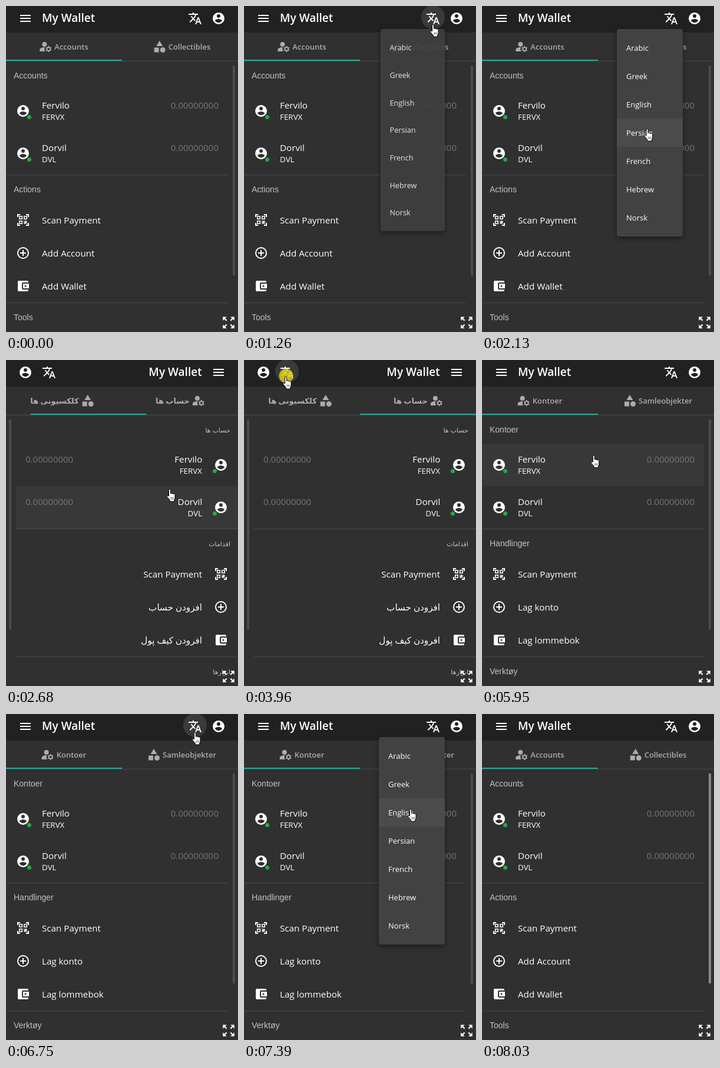
An HTML page with a canvas that plays this animation: 394x553 px, repeating every 9.2 s.

```html
<!DOCTYPE html>
<html lang="en">
<head>
<meta charset="utf-8">
<title>Wallet language menu</title>
<style>
  html, body { margin: 0; width: 100%; height: 100%; overflow: hidden; background: #303030; }
  canvas { display: block; }
</style>
</head>
<body>
<canvas id="stage" width="394" height="553"></canvas>
<script>
const W = 394, H = 553, LOOP = 9200, STEP = 79.5;
const ctx = document.getElementById('stage').getContext('2d');
const UI = '"Open Sans", "DejaVu Sans", sans-serif';
const HEAD = '"Liberation Sans", "DejaVu Sans", sans-serif';

const icons = {
  menu: 'M3 18h18v-2H3zM3 13h18v-2H3zM3 6v2h18V6z',
  translate: 'M12.87 15.07l-2.54-2.51.03-.03c1.74-1.94 2.98-4.17 3.71-6.53H17V4h-7V2H8v2H1v1.99h11.17C11.5 7.92 10.44 9.75 9 11.35 8.07 10.32 7.3 9.19 6.69 8h-2c.73 1.63 1.73 3.17 2.98 4.56l-5.09 5.02L4 19l5-5 3.11 3.11zM18.5 10h-2L12 22h2l1.12-3h4.75L21 22h2zm-2.62 7l1.62-4.33L19.12 17z',
  person: 'M12 2a10 10 0 1 0 0 20a10 10 0 1 0 0-20zm0 3a3 3 0 1 1 0 6a3 3 0 1 1 0-6zm0 14.2c-2.5 0-4.71-1.28-6-3.22.03-1.99 4-3.08 6-3.08s5.97 1.09 6 3.08c-1.29 1.94-3.5 3.22-6 3.22z',
  manage: 'M10 4a4 4 0 1 0 0 8a4 4 0 1 0 0-8zM10.67 13.02C8 12.9 5.4 13.6 3.39 14.82 2.5 15.34 2 16.32 2 17.35V20h9.26a7 7 0 0 1-.59-6.98zM20.75 16l-.06-.63 1.14-1.01-1-1.73-1.45.49-1.08-.63L18 11h-2l-.3 1.49-1.08.63-1.45-.49-1 1.73 1.14 1.01v1.26l-1.14 1.01 1 1.73 1.45-.49 1.08.63L16 21h2l.3-1.49 1.08-.63 1.45.49 1-1.73-1.14-1.01zM17 14a2 2 0 1 1 0 4a2 2 0 1 1 0-4z',
  shapes: 'M12 2l-5.5 9h11zM3 13.5h8v8H3zM17.5 13a4.5 4.5 0 1 0 0 9a4.5 4.5 0 1 0 0-9z',
  scan: 'M5 5h6v6H5zm1.5 1.5v3h3v-3zM5 13h6v6H5zm1.5 1.5v3h3v-3zM13 5h6v6h-6zm1.5 1.5v3h3v-3zM13 13h1.5v1.5H16V13h1.5v1.5H19V16h-1.5v1.5H19V19h-1.5v-1.5H16V19h-1.5v-1.5H13V16h1.5v-1.5H13zM22 7h-2V4h-3V2h5zM22 22v-5h-2v3h-3v2zM2 22h5v-2H4v-3H2zM2 2v5h2V4h3V2z',
  add: 'M13 7h-2v4H7v2h4v4h2v-4h4v-2h-4zM12 2a10 10 0 1 0 0 20a10 10 0 1 0 0-20zm0 2a8 8 0 1 1 0 16a8 8 0 1 1 0-16z',
  wallet: 'M21 18v1a2 2 0 0 1-2 2H5a2 2 0 0 1-2-2V5a2 2 0 0 1 2-2h14a2 2 0 0 1 2 2v1h-9a2 2 0 0 0-2 2v8a2 2 0 0 0 2 2zM12 16h10V8H12zm4-5.5a1.5 1.5 0 1 1 0 3a1.5 1.5 0 1 1 0-3z',
  expand: 'M15 3l2.3 2.3-2.89 2.87 1.42 1.42L18.7 6.7 21 9V3zM3 9l2.3-2.3 2.87 2.89 1.42-1.42L6.7 5.3 9 3H3zM9 21l-2.3-2.3 2.89-2.87-1.42-1.42L5.3 17.3 3 15v6zM21 15l-2.3 2.3-2.87-2.89-1.42 1.42 2.89 2.87L15 21h6z'
};
for (const name in icons) icons[name] = new Path2D(icons[name]);
const hand = new Path2D('M4 2.2a1.5 1.5 0 0 1 3 0V8a1.4 1.4 0 0 1 2.6.5 1.4 1.4 0 0 1 2.5.7 1.3 1.3 0 0 1 2.4 1.1V15q0 2-1.2 3.6V21.5H5.8V19.2L1.2 13.7a1.5 1.5 0 0 1 2-2L4 12.4z');

const languages = ['Arabic', 'Greek', 'English', 'Persian', 'French', 'Hebrew', 'Norsk'];
const texts = {
  en: { tabs: ['Accounts', 'Collectibles'], heads: ['Accounts', 'Actions', 'Tools'],
        actions: ['Scan Payment', 'Add Account', 'Add Wallet'] },
  fa: { tabs: ['حساب ها', 'کلکسیونی ها'], heads: ['حساب ها', 'اقدامات', 'ابزارها'],
        actions: ['Scan Payment', 'افزودن حساب', 'افرودن کیف پول'] },
  no: { tabs: ['Kontoer', 'Samleobjekter'], heads: ['Kontoer', 'Handlinger', 'Verktøy'],
        actions: ['Scan Payment', 'Lag konto', 'Lag lommebok'] }
};
const accounts = [['Fervilo', 'FERVX'], ['Dorvil', 'DVL']];

// Timeline in ms: bursts are [start, steps], menus are [open, close].
const bursts = [[70, 12], [1090, 12], [2050, 3], [2360, 12], [3320, 6], [3880, 12],
                [4840, 12], [5790, 12], [6750, 12], [7710, 5]];
const clicks = [1165, 2355, 3955, 4835, 6660, 7705];
const menus = [[1190, 2440], [3980, 4920], [6770, 7790]];
const TO_FA = 2530, TO_NO = 5010, TO_EN = 7860;
const pointerPath = [
  [70, 309, 520], [310, 311, 400], [550, 315, 210], [790, 320, 60], [940, 321, 32],
  [1090, 321, 31], [1330, 321, 31], [1570, 312, 75], [1810, 293, 155], [1960, 286, 185],
  [2210, 278, 219], [2690, 278, 219], [2920, 235, 180], [3240, 134, 101], [3400, 105, 65],
  [3560, 82, 38], [3710, 72, 32], [3880, 71, 28], [4120, 71, 28], [4440, 95, 200],
  [4710, 115, 355], [5100, 115, 355], [5400, 120, 345], [5710, 137, 295], [5950, 190, 161],
  [6350, 312, 40], [6590, 321, 31], [6830, 321, 31], [7070, 305, 100], [7380, 283, 161],
  [7800, 283, 161], [7945, 378, 215]
];

const clamp = v => Math.max(0, Math.min(1, v));
const smooth = v => { v = clamp(v); return v * v * (3 - 2 * v); };

function recorded(t) {
  const burst = bursts.filter(b => b[0] <= t).pop();
  if (!burst) return 0;
  const [start, steps] = burst;
  return start + Math.min(steps - 1, Math.floor((t - start) / STEP)) * STEP;
}

function pointerAt(t) {
  if (t < 70 || t > 8020) return null;
  const i = pointerPath.findIndex(k => k[0] > t);
  if (i < 0) return pointerPath[pointerPath.length - 1].slice(1);
  const a = pointerPath[i - 1], b = pointerPath[i], p = (t - a[0]) / (b[0] - a[0]);
  return [a[1] + (b[1] - a[1]) * p, a[2] + (b[2] - a[2]) * p];
}

let rtl = false;
const mirror = x => rtl ? W - x : x;

function rect(x, y, w, h, color) {
  ctx.fillStyle = color;
  ctx.fillRect(rtl ? W - x - w : x, y, w, h);
}
function disc(x, y, r, color) {
  ctx.fillStyle = color;
  ctx.beginPath();
  ctx.arc(x, y, r, 0, 7);
  ctx.fill();
}
function text(str, x, y, font, color = '#fff', align = 'start') {
  ctx.font = font;
  ctx.fillStyle = color;
  ctx.textAlign = align;
  ctx.fillText(str, mirror(x), y);
}
function icon(name, x, y, color = '#fff', size = 24) {
  ctx.save();
  ctx.translate(x - size / 2, y - size / 2);
  ctx.scale(size / 24, size / 24);
  ctx.fillStyle = color;
  ctx.fill(icons[name], 'evenodd');
  ctx.restore();
}

function drawHeader(pointer) {
  rect(0, 0, W, 45, '#212121');
  const x = mirror(321);
  if (pointer && Math.hypot(pointer[0] - x, pointer[1] - 19) < 12.5) disc(x, 19, 20, '#3a3a3a');
  icon('menu', mirror(33), 21);
  text('My Wallet', 61, 27, `600 19px ${UI}`);
  icon('translate', x, 21);
  icon('person', mirror(361), 21);
}

function drawTabs(labels, t) {
  rect(0, 93, W, 1, '#494949');
  labels.forEach((label, i) => {
    ctx.font = `600 13px ${UI}`;
    const left = [97.5, 298][i] - (27 + ctx.measureText(label).width) / 2;
    icon(i ? 'shapes' : 'manage', mirror(left + 12), 69, '#acacac');
    text(label, left + 27, 74, ctx.font, '#acacac');
  });
  const shift = smooth((t - TO_FA) / 500) - smooth((t - TO_NO) / 500);
  ctx.fillStyle = '#26a69a';
  ctx.fillRect(197 * shift, 91, 197, 2);
}

function drawList(words, pointer, t) {
  const rowTops = [142, 214, 335, 391, 447], rowHeights = [72, 72, 56, 56, 56];
  if (pointer) rowTops.forEach((top, i) => {
    if (pointer[1] >= top && pointer[1] < top + rowHeights[i]) rect(0, top, 377, rowHeights[i], '#383838');
  });
  const headFont = `${rtl ? 11 : 14}px ${HEAD}`;
  words.heads.forEach((head, i) => text(head, 13, [123, 316, 533][i], headFont, '#c1c1c1'));
  accounts.forEach(([name, ticker], i) => {
    const y = 72 * i;
    icon('person', mirror(29), 178 + y);
    disc(mirror(39.5), 188.5 + y, 3.5, '#28a745');
    text(name, 61, 174 + y, `15.2px ${UI}`);
    text(ticker, 61, 193 + y, `13.4px ${UI}`);
    text('0.00000000', 361, 174 + y, `15px ${UI}`, '#757575', 'end');
  });
  words.actions.forEach((action, i) => {
    icon(['scan', 'add', 'wallet'][i], mirror(29), 363 + 56 * i);
    text(action, 61, 369 + 56 * i, `15.2px ${UI}`);
  });
  rect(0, 286, 377, 1, '#494949');
  rect(0, 503, 377, 1, '#494949');
  rect(385, 101, 4, 356, t > 7940 ? '#8a8a8a' : '#4d4d4d');
  icon('expand', 378, 537, '#fff', 26);
}

function drawMenu(pointer, opened, alpha) {
  const scale = 0.8 + 0.2 * opened, edge = mirror(341);
  ctx.save();
  ctx.globalAlpha = alpha;
  ctx.translate(edge, 39);
  ctx.scale(scale, scale);
  ctx.translate(-edge, -39);
  ctx.save();
  ctx.shadowColor = 'rgba(0,0,0,.45)';
  ctx.shadowBlur = 8;
  ctx.shadowOffsetY = 3;
  ctx.fillStyle = '#424242';
  ctx.beginPath();
  ctx.roundRect(mirror(rtl ? 341 : 229), 39, 112, 352, 4);
  ctx.fill();
  ctx.restore();
  languages.forEach((language, i) => {
    const top = 47 + 48 * i;
    if (pointer && pointer[1] >= top && pointer[1] < top + 48) rect(229, top, 112, 48, '#4b4b4b');
    text(language, 245, top + 29, `13px ${UI}`);
  });
  ctx.restore();
}

function drawPointer([x, y], clicked) {
  if (clicked) disc(x + 0.5, y - 1, 12, 'rgba(222,202,20,.85)');
  ctx.save();
  ctx.translate(x - 5.5, y - 0.5);
  ctx.fillStyle = '#fff';
  ctx.strokeStyle = '#000';
  ctx.lineWidth = 1;
  ctx.fill(hand);
  ctx.stroke(hand);
  ctx.beginPath();
  for (const fx of [7.5, 9.5, 11.5]) {
    ctx.moveTo(fx, 14);
    ctx.lineTo(fx, 18);
  }
  ctx.globalAlpha = 0.6;
  ctx.stroke();
  ctx.restore();
}

function draw(now) {
  const t = recorded(now % LOOP);
  const words = texts[t < TO_FA || t >= TO_EN ? 'en' : t < TO_NO ? 'fa' : 'no'];
  rtl = words === texts.fa;
  ctx.direction = rtl ? 'rtl' : 'ltr';
  const pointer = pointerAt(t);
  const menu = menus.find(([open, close]) => t >= open && t < close + 100);

  rect(0, 0, W, H, '#303030');
  drawHeader(pointer);
  drawTabs(words.tabs, t);
  drawList(words, menu ? null : pointer, t);
  if (menu) {
    const opened = 1 - (1 - clamp((t - menu[0]) / 120)) ** 3;
    drawMenu(pointer, opened, opened * (1 - clamp((t - menu[1]) / 100)));
  }
  if (pointer) drawPointer(pointer, clicks.some(c => t >= c && t < c + 79));
}

const began = performance.now();
(function tick() {
  draw(performance.now() - began);
  requestAnimationFrame(tick);
})();
</script>
</body>
</html>
```
